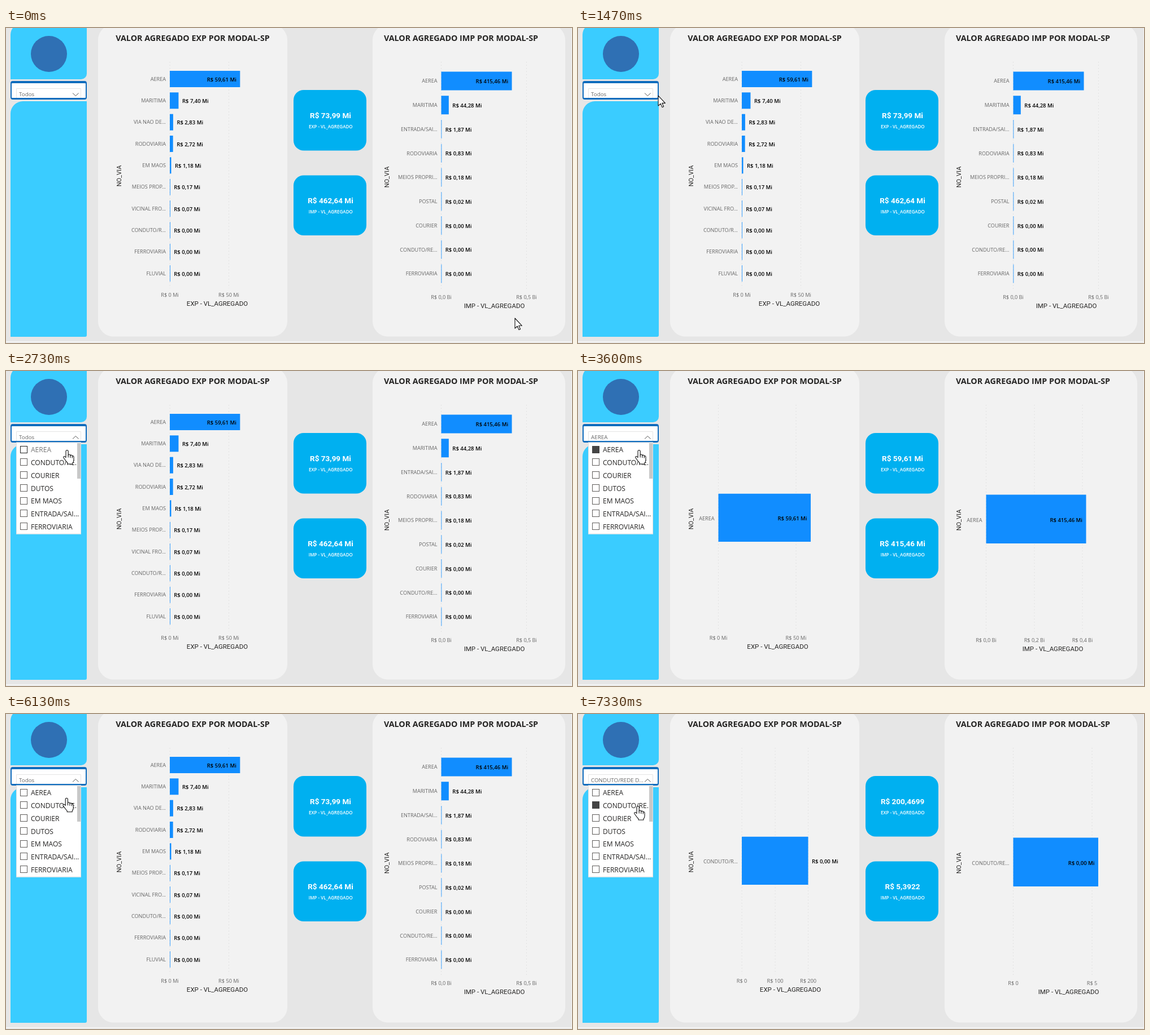
These frames come from a looping animation (1002x559 px, 8 s). An HTML page with a canvas:

```html
<!DOCTYPE html>
<html lang="pt">
<head>
<meta charset="utf-8">
<title>Valor agregado por modal</title>
<style>
html, body { margin: 0; width: 100%; height: 100%; overflow: hidden; background: #e6e6e6; }
canvas { display: block; }
</style>
</head>
<body>
<canvas id="stage" width="1002" height="559"></canvas>
<script>
const g = document.getElementById('stage').getContext('2d');
const LOOP = 8000, STEP = 1000 / 15;
const SANS = '"Open Sans", "Noto Sans", sans-serif', DIN = 'Roboto, Arial, sans-serif';
const BAR = '#118dff', INK = '#252423', GRAY = '#666', SKY = '#3accff';

// Layout shared by all states of each chart
const EXP = { title: 'EXP', mid: 330.5, side: 200, sideY: 262.5, first: 90.5, gap: 38.33, bar: 29, solo: [217.7, 85.3], soloText: 262, foot: 462, tick: 474, name: 489 };
const IMP = { title: 'IMP', mid: 805.5, side: 674, sideY: 264.5, first: 94, gap: 42.75, bar: 33, solo: [219.5, 86.5], soloText: 264.5, foot: 466, tick: 478, name: 493.3 };

// rows: category, amount in millions; ticks: x, label
const VIEWS = {
  all: {
    cards: ['R$ 73,99 Mi', 'R$ 462,64 Mi'],
    exp: { x: 290, scale: 2.086, name: 374, ticks: [[290, 'R$ 0 Mi'], [394.5, 'R$ 50 Mi']],
      rows: [['AEREA', 59.61], ['MARITIMA', 7.4], ['VIA NAO DE...', 2.83], ['RODOVIARIA', 2.72], ['EM MAOS', 1.18],
        ['MEIOS PROP...', .17], ['VICINAL FRO...', .07], ['CONDUTO/R...', 0], ['FERROVIARIA', 0], ['FLUVIAL', 0]] },
    imp: { x: 770.5, scale: .301, name: 864.5, ticks: [[770.5, 'R$ 0,0 Bi'], [921.5, 'R$ 0,5 Bi']],
      rows: [['AEREA', 415.46], ['MARITIMA', 44.28], ['ENTRADA/SAI...', 1.87], ['RODOVIARIA', .83], ['MEIOS PROPRI...', .18],
        ['POSTAL', .02], ['COURIER', 0], ['CONDUTO/RE...', 0], ['FERROVIARIA', 0]] }
  },
  air: {
    cards: ['R$ 59,61 Mi', 'R$ 415,46 Mi'],
    exp: { x: 248.5, scale: 2.743, name: 353.5, ticks: [[248.5, 'R$ 0 Mi'], [386, 'R$ 50 Mi']], rows: [['AEREA', 59.61]] },
    imp: { x: 722.5, scale: .426, name: 840.5, ticks: [[722.5, 'R$ 0,0 Bi'], [808, 'R$ 0,2 Bi'], [893, 'R$ 0,4 Bi']], rows: [['AEREA', 415.46]] }
  },
  duct: {
    cards: ['R$ 200,4699', 'R$ 5,3922'],
    exp: { x: 290, scale: 586000, name: 376, ticks: [[290, 'R$ 0'], [349, 'R$ 100'], [407.5, 'R$ 200']], rows: [['CONDUTO/R...', .0002004699]] },
    imp: { x: 770.5, scale: 27910000, name: 868.5, ticks: [[770.5, 'R$ 0'], [910, 'R$ 5']], rows: [['CONDUTO/RE...', .0000053922]] }
  }
};
const OPTIONS = ['AEREA', 'CONDUTO/RE...', 'COURIER', 'DUTOS', 'EM MAOS', 'ENTRADA/SAI...', 'FERROVIARIA'];

// Pointer path: time, x, y
const PATH = [[0, 901, 515], [867, 232, 205], [1467, 142, 120], [1733, 122, 119], [1800, 122, 119], [1867, 123, 119],
  [2467, 123, 119], [2600, 118, 164], [2733, 109, 141], [6000, 109, 141], [6333, 107, 163], [6467, 107, 163],
  [6533, 107, 164], [8000, 107, 164]];

function text(s, x, y, size, color, align = 'left', weight = 400, family = SANS) {
  g.font = `${weight} ${size}px ${family}`;
  g.fillStyle = color;
  g.textAlign = align;
  g.fillText(s, x, y + size * .357);
}
function rect(x, y, w, h, color, r = 0) {
  g.fillStyle = color;
  g.beginPath();
  g.roundRect(x, y, w, h, r);
  g.fill();
}
function disc(x, y, r, color) {
  g.fillStyle = color;
  g.beginPath();
  g.arc(x, y, r, 0, 7);
  g.fill();
}
function frame(x, y, w, h, color) {
  g.strokeStyle = color;
  g.lineWidth = 1;
  g.strokeRect(x, y, w, h);
}
function line(color, ...points) {
  g.strokeStyle = color;
  g.lineWidth = 1;
  g.beginPath();
  for (const [x, y] of points) g.lineTo(x, y);
  g.stroke();
}

function chart(c, d) {
  text(`VALOR AGREGADO ${c.title} POR MODAL-SP`, c.mid, 17.5, 14.3, INK, 'center', 700);
  for (const [x, label] of d.ticks) {
    g.setLineDash([1.5, 4]);
    line('#dcdcdc', [x, 60], [x, c.foot]);
    g.setLineDash([]);
    text(label, x, c.tick, 9.2, GRAY, 'center');
  }
  const solo = d.rows.length === 1;
  d.rows.forEach(([label, amount], i) => {
    const mid = solo ? c.soloText : c.first + i * c.gap;
    const [top, h] = solo ? c.solo : [mid - c.bar / 2, c.bar];
    const w = Math.max(.8, amount * d.scale), inside = w > 120;
    rect(d.x, top, w, h, BAR);
    text(label, d.x - 7, mid, 9.15, GRAY, 'right');
    text(`R$ ${amount.toFixed(2).replace('.', ',')} Mi`, d.x + w + (inside ? -6.5 : 6.5), mid + (solo ? 0 : .7),
      9.5, '#000', inside ? 'right' : 'left', 600);
  });
  text(`${c.title} - VL_AGREGADO`, d.name, c.name, 11.5, INK, 'center', 400, DIN);
  g.save();
  g.translate(c.side, c.sideY);
  g.rotate(-Math.PI / 2);
  text('NO_VIA', 0, 0, 11, INK, 'center', 400, DIN);
  g.restore();
}

function card(y, h, value, label) {
  rect(509, y, 129, h, '#00b0f0', 18);
  const mid = y + h / 2;
  text(value, 574.5, mid - 8.5, 13.5, '#fff', 'center', 700, DIN);
  text(label, 574.8, mid + 11, 8, '#fff', 'center', 600);
}

function slicer(label, up) {
  rect(8, 94, 135, 33, '#0f6cbd', 4);
  rect(10, 98, 131, 26, '#fff', 1);
  line('#e4e4e4', [18.5, 124], [18.5, 107.5], [132.5, 107.5], [132.5, 124]);
  text(label, 23, 118, 9.8, GRAY);
  const d = up ? -2.5 : 2.5;
  line('#555', [118, 118 - d], [123.3, 118 + d], [128.6, 118 - d]);
}

function menu(checked, hover) {
  rect(18, 126.5, 115, 163, '#fff');
  frame(18.5, 127, 114, 162, '#e0e0e0');
  OPTIONS.forEach((label, i) => {
    const y = 139.5 + i * 22.75;
    if (i === checked) rect(25, Math.round(y - 7), 13, 13, '#444');
    else frame(25.5, Math.round(y - 6) - .5, 12, 12, i === hover ? '#222' : '#605e5c');
    text(label, 44, y + .5, 12.05, i === hover ? '#777' : INK);
  });
  rect(126, 128, 6, 63, '#c8c8c8');
}

const ARROW = new Path2D('M0 0V18L4.2 14.2L7 20.6L9.6 19.5L6.8 13.3H12.4Z');
const HAND = new Path2D('M-3 2Q-3-.5-1-.5Q1.2-.5 1.2 2V8.5Q1.5 6.8 3 7Q4.8 7.2 4.8 9Q5.5 7.8 7 8.3Q8.3 8.7 8.3 10.2Q9.3 9.2 10.3 10Q11 10.5 11 12V17Q11 20 9 22V24H0V22Q-2.5 19.5-4.5 16.5L-7 13Q-7.8 11-6 10.5Q-4.8 10.3-3 12.5Z');
const FINGERS = new Path2D('M1.2 8V12.5M4.8 9V13M8.3 10.5V13.5');

function pointer(t) {
  const i = Math.max(1, PATH.findIndex(p => p[0] >= t));
  const [t0, x0, y0] = PATH[i - 1], [t1, x1, y1] = PATH[i];
  let u = (t - t0) / (t1 - t0);
  if (i === 1) u = u * u * (3 - 2 * u);
  g.save();
  g.translate(x0 + (x1 - x0) * u, y0 + (y1 - y0) * u);
  const shape = t < 2500 ? ARROW : HAND;
  g.fillStyle = '#fff';
  g.strokeStyle = '#111';
  g.lineWidth = 1.1;
  g.lineJoin = 'round';
  g.fill(shape);
  g.stroke(shape);
  if (shape === HAND) g.stroke(FINGERS);
  g.restore();
}

function draw(t) {
  const clicks = [3467, 5600, 7200];
  const since = Math.min(...clicks.filter(c => t >= c - 1).map(c => t - c));
  const busy = since < 130;
  const picked = t < 3466 ? -1 : t < 5599 ? 0 : t < 7199 ? -1 : 1;
  const view = VIEWS[t < 3599 ? 'all' : t < 5732 ? 'air' : t < 7332 ? 'all' : 'duct'];
  const open = t > 2060;
  const hover = t > 2660 && t < 3466 ? 0 : t > 6190 && t < 7199 ? 1 : -1;

  rect(0, 0, 1002, 559, '#e6e6e6');
  rect(0, 556, 1002, 1.5, '#f8f8f8');
  rect(1001, 0, 1, 559, '#f4f4f4');
  rect(8, -8, 135, 99, SKY, [20, 0, 10, 0]);
  rect(8, 130, 135, 418, SKY, [22, 0, 3, 0]);
  disc(76, 46, 32, '#2f70b4');
  rect(163, -6, 335, 553.5, '#f2f2f2', 27);
  rect(649, -6, 341, 553.5, '#f2f2f2', 27);

  chart(EXP, view.exp);
  chart(IMP, view.imp);
  card(110, 107.5, view.cards[0], 'EXP - VL_AGREGADO');
  card(261.5, 106.5, view.cards[1], 'IMP - VL_AGREGADO');
  if (busy) {
    for (const [x, y] of [[202.5, 67.5], [676.5, 67.5], [529.5, 141.5], [521.5, 284.5]]) disc(x, y, 1.2, '#555');
  }
  slicer(['Todos', 'AEREA', 'CONDUTO/REDE D...'][picked + 1], open && !(since < 60));
  if (open) menu(picked, hover);
  pointer(t);
}

function tick(now) {
  const t = now % LOOP;
  draw(Math.floor(t / STEP + .06) * STEP % LOOP);
  requestAnimationFrame(tick);
}
draw(0);
requestAnimationFrame(tick);
</script>
</body>
</html>
```
